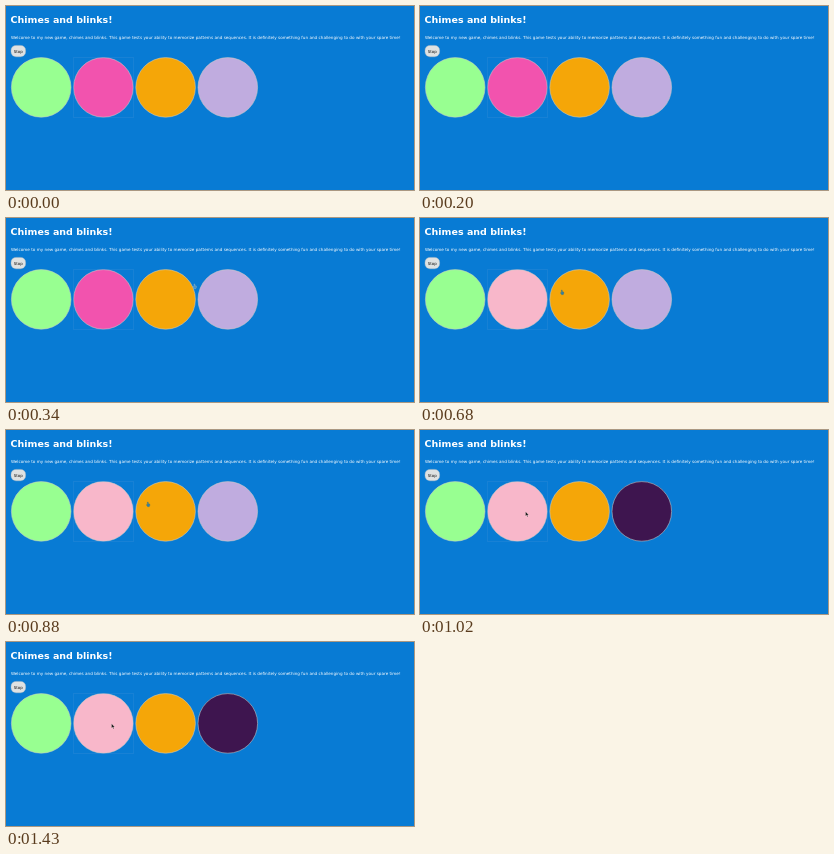
Animation, 408 px wide and 184 px high, one loop 1700 ms. Source, as an HTML page:

```html
<!DOCTYPE html>
<html lang="en">
<head>
<meta charset="utf-8">
<title>Chimes and blinks!</title>
<style>
  html, body { margin: 0; width: 100%; height: 100%; overflow: hidden; background: #087bd4; }
  svg { display: block; width: 408px; height: 184px; }
  text { font-family: "DejaVu Sans", sans-serif; fill: #fff; }
  .title { font-size: 9.5px; font-weight: bold; }
  .intro { font-size: 4.168px; }
  .label { font-size: 4px; fill: #111; text-anchor: middle; }
  .pad { stroke: #c9cbc6; stroke-width: .55; }
  .focus { fill: none; stroke: #3f93d8; stroke-width: .6; stroke-dasharray: 1 1; }
</style>
</head>
<body>
<svg viewBox="0 0 408 184">
  <rect width="408" height="184" fill="#087bd4"/>
  <text class="title" x="4.6" y="17">Chimes and blinks!</text>
  <text class="intro" x="4.9" y="32.6">Welcome to my new game, chimes and blinks. This game tests your ability to memorize patterns and sequences. It is definitely something fun and challenging to do with your spare time!</text>
  <rect x="5" y="39.4" width="14.6" height="11.4" rx="5" fill="#dfe2e2" stroke="#b4bcc0" stroke-width=".4"/>
  <text class="label" x="12.3" y="46.7">Stop</text>
  <g id="pads"></g>
  <rect class="focus" x="67.5" y="51.5" width="60" height="60"/>
  <g id="cursor">
    <path id="hand" d="M1 0h.8v1.6l1.6.5v1.5l-.6 1.1H1.3L0 3l.3-.5.7.3z" stroke-width=".35"/>
    <path id="arrow" d="M0 0v4.2l1-.9.7 1.6.7-.3-.7-1.5h1.3z" fill="#111" stroke="#fff" stroke-width=".2"/>
  </g>
</svg>
<script>
  const LOOP = 1700;
  const byId = id => document.getElementById(id);
  const hotPink = "#f253ae", softPink = "#f8b7ca";
  const lavender = "#c0acdf", plum = "#3e154f";

  const pads = ["#98ff91", hotPink, "#f5a608", lavender].map((fill, i) => {
    const pad = document.createElementNS("http://www.w3.org/2000/svg", "circle");
    const attrs = { class: "pad", cx: 35.2 + i * 62.2, cy: 81.4, r: 29.8, fill };
    for (const name in attrs) pad.setAttribute(name, attrs[name]);
    byId("pads").append(pad);
    return pad;
  });

  const steps = [
    { at: 0, pink: hotPink, violet: lavender },
    { at: 340, pink: hotPink, violet: lavender, hand: ["#4d93c4", "#a3bccb"], pos: [187, 66] },
    { at: 680, pink: softPink, violet: lavender, hand: ["#2f7fa8", "#4a7468"], pos: [140.4, 72] },
    { at: 1020, pink: softPink, violet: plum, arrow: true, pos: [105.6, 81.8] }
  ];

  function draw(now) {
    const time = now % LOOP;
    const step = steps.findLast(s => s.at <= time);
    const [x, y] = step.pos || [0, 0];
    const [fill, stroke] = step.hand || ["none", "none"];
    pads[1].setAttribute("fill", step.pink);
    pads[3].setAttribute("fill", step.violet);
    byId("cursor").setAttribute("transform", `translate(${x} ${y})`);
    byId("hand").setAttribute("fill", fill);
    byId("hand").setAttribute("stroke", stroke);
    byId("arrow").setAttribute("visibility", step.arrow ? "visible" : "hidden");
  }

  const start = performance.now();
  function tick() {
    draw(performance.now() - start);
    requestAnimationFrame(tick);
  }
  tick();
</script>
</body>
</html>
```
